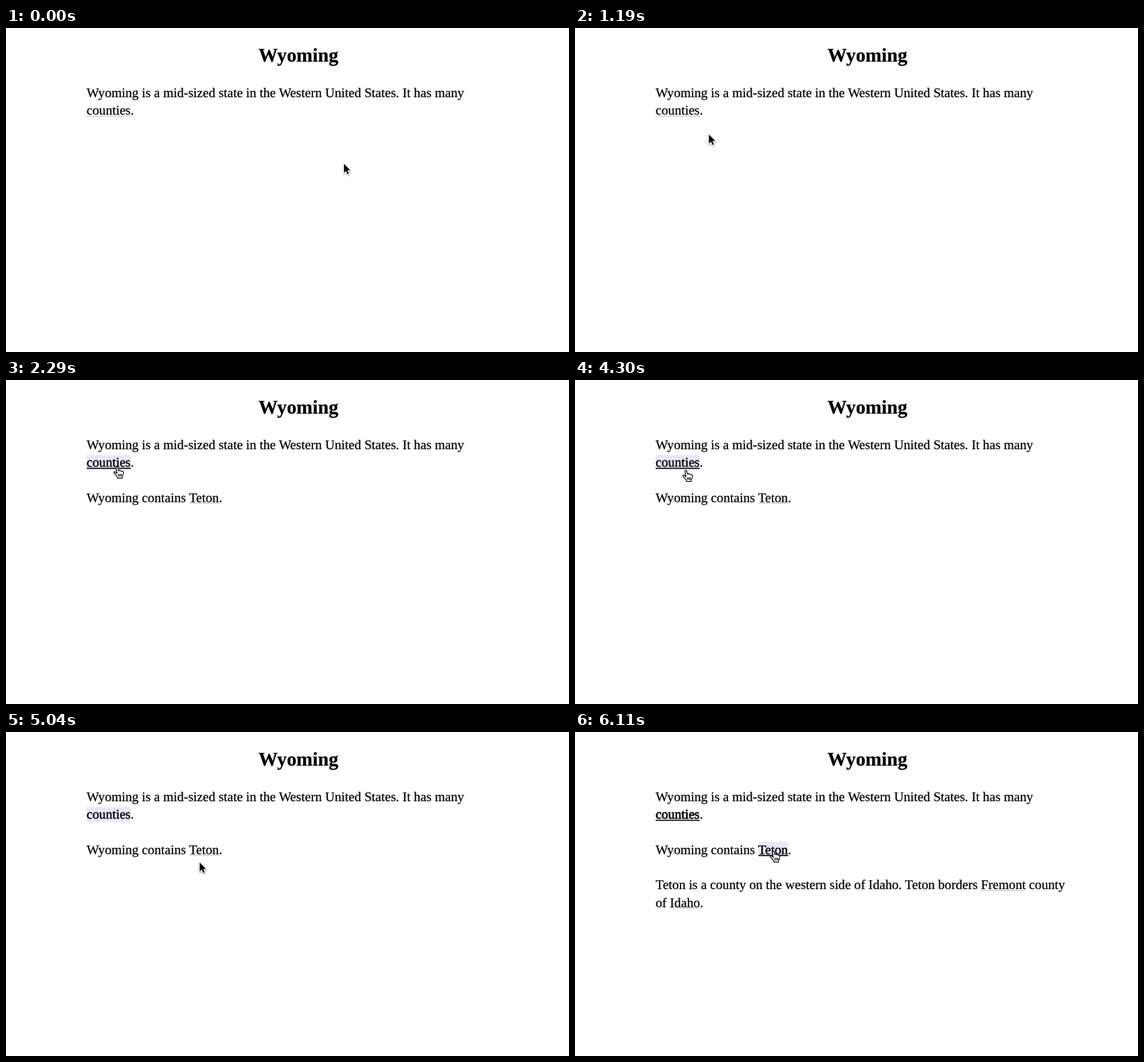
Write an HTML page that moves like this. It is 838 by 483 pixels and loops after 8000 ms.

```html
<!DOCTYPE html>
<html lang="en">
<head>
<meta charset="utf-8">
<title>Wyoming</title>
<style>
  html, body { margin: 0; width: 100%; height: 100%; overflow: hidden; background: #fff; }
  svg { display: block; width: 838px; height: 483px; }
  text {
    font: 19.67px "Liberation Serif", "Times New Roman", serif;
    text-rendering: geometricPrecision;
    stroke: #000; stroke-width: .25;
  }
  .title { font-size: 28.8px; font-weight: bold; text-anchor: middle; }
  .marked { stroke-width: .4; }
  .visited { stroke-width: .75; }
  .mark { fill: #e8e8fb; }
  .idle { fill: #bbb; }
  #arrow { filter: drop-shadow(0 1px 1px rgba(0, 0, 0, .4)); }
  #arrow path { stroke: #fff; stroke-width: 2; paint-order: stroke; }
  #hand path { fill: #fff; stroke: #000; stroke-width: 1.1; stroke-linejoin: round; }
</style>
</head>
<body>
<svg viewBox="0 0 838 483">
  <rect id="countiesMark" class="mark" x="120" y="112" width="65.5" height="22"/>
  <rect id="tetonMark" class="mark" x="273" y="164" width="44.5" height="22"/>

  <text class="title" x="435.3" y="49.8">Wyoming</text>
  <text x="120" y="103.2">Wyoming is a mid-sized state in the Western United States. It has many</text>
  <text x="120" y="129.4"><tspan id="counties">counties</tspan>.</text>
  <rect id="countiesLine" x="120" y="130.8" width="65.7"/>

  <g id="second">
    <text x="120" y="181.9">Wyoming contains <tspan id="teton">Teton</tspan>.</text>
    <rect id="tetonLine" x="273" y="183.3" width="44.3"/>
  </g>

  <g id="third">
    <text x="120" y="234.4">Teton is a county on the western side of Idaho. Teton borders Fremont county</text>
    <text x="120" y="260.6">of Idaho.</text>
    <rect class="idle" x="604" y="236" width="66.5" height="1"/>
    <rect class="idle" x="141" y="262" width="45.5" height="1"/>
  </g>

  <g id="arrow">
    <path transform="translate(0 .3) scale(1.06)" d="M.5 1.5V14.2l2.9-2.8 2.1 4.8 2-.9-2.1-4.7h4Z"/>
  </g>
  <g id="hand">
    <g transform="translate(-.3 -.3) scale(1.07)">
      <path d="M-1.3 2.3C-1.5 .6 .8 .4 1.2 2L2.1 6.2C2.5 5.3 4.3 5.3 4.5 6.6C5 5.8 6.5 6 6.7 7.2C7.5 6.6 9.1 7 9 8.6C9 11 8.3 12.6 7.3 14V16.5H.7V15C-.5 13-2 11.6-3.9 9.4C-5.1 7.8-3.5 6.8-2.1 8L-.1 9.9Z"/>
      <path d="M2.2 10.5v3.5M4.1 10.5v3.5M6 10.5v3.5"/>
    </g>
  </g>
</svg>
<script>
const LOOP = 8000, FIRST_CLICK = 2290, SECOND_CLICK = 6110;
const $ = id => document.getElementById(id);
const show = (id, on) => $(id).style.display = on ? '' : 'none';

// Pointer strokes: [time, x, y] of the hotspot
const strokes = [
  [[370, 502.5, 200.5], [600, 430, 230], [830, 327.5, 217.5], [1010, 253, 187], [1190, 199, 157], [1570, 165.5, 129]],
  [[4300, 165.5, 134], [4480, 207, 185], [4690, 261.5, 207], [4890, 282, 203], [5090, 289, 189.5], [5390, 295.5, 176.5]]
];

// Smooth curve through timed points, at rest at both ends
function along(points, t) {
  const last = points.length - 1;
  if (t >= points[last][0]) return points[last].slice(1);
  if (t <= points[0][0]) return points[0].slice(1);
  const i = points.findIndex(p => p[0] > t) - 1;
  const a = points[i], b = points[i + 1], span = b[0] - a[0], u = (t - a[0]) / span;
  const slope = (k, axis) => k === 0 || k === last ? 0 :
    (points[k + 1][axis] - points[k - 1][axis]) / (points[k + 1][0] - points[k - 1][0]);
  return [1, 2].map(axis =>
    a[axis] + (b[axis] - a[axis]) * u * u * (3 - 2 * u) +
    span * u * (1 - u) * (slope(i, axis) * (1 - u) - slope(i + 1, axis) * u));
}

function styleLink(id, { hovered, marked, visited }) {
  const dark = hovered || visited;
  show(id + 'Mark', marked);
  show(id + 'Line', dark || !marked);
  $(id + 'Line').setAttribute('class', dark ? '' : 'idle');
  $(id + 'Line').setAttribute('height', dark ? (marked || visited ? 1.6 : 1.25) : 1);
  $(id).setAttribute('class', visited ? 'visited' : marked ? 'marked' : '');
}

function draw(t) {
  const [x, y] = along(strokes[t < strokes[1][0][0] ? 0 : 1], t);
  const over = (left, top, right, bottom) => x >= left && x <= right && y >= top && y <= bottom;
  const opened = t >= FIRST_CLICK, finished = t >= SECOND_CLICK;
  const onCounties = over(120, 112, 186, 134.5);
  const onTeton = opened && over(273, 164, 317, 187);
  const pointing = onCounties || onTeton;

  show('second', opened);
  show('third', finished);
  styleLink('counties', { hovered: onCounties, marked: opened && !finished, visited: finished });
  styleLink('teton', { hovered: onTeton, marked: finished, visited: false });

  show('arrow', !pointing);
  show('hand', pointing);
  $(pointing ? 'hand' : 'arrow').setAttribute('transform', `translate(${x} ${y})`);
}

function tick() {
  draw(performance.now() % LOOP);
  requestAnimationFrame(tick);
}
tick();
</script>
</body>
</html>
```
